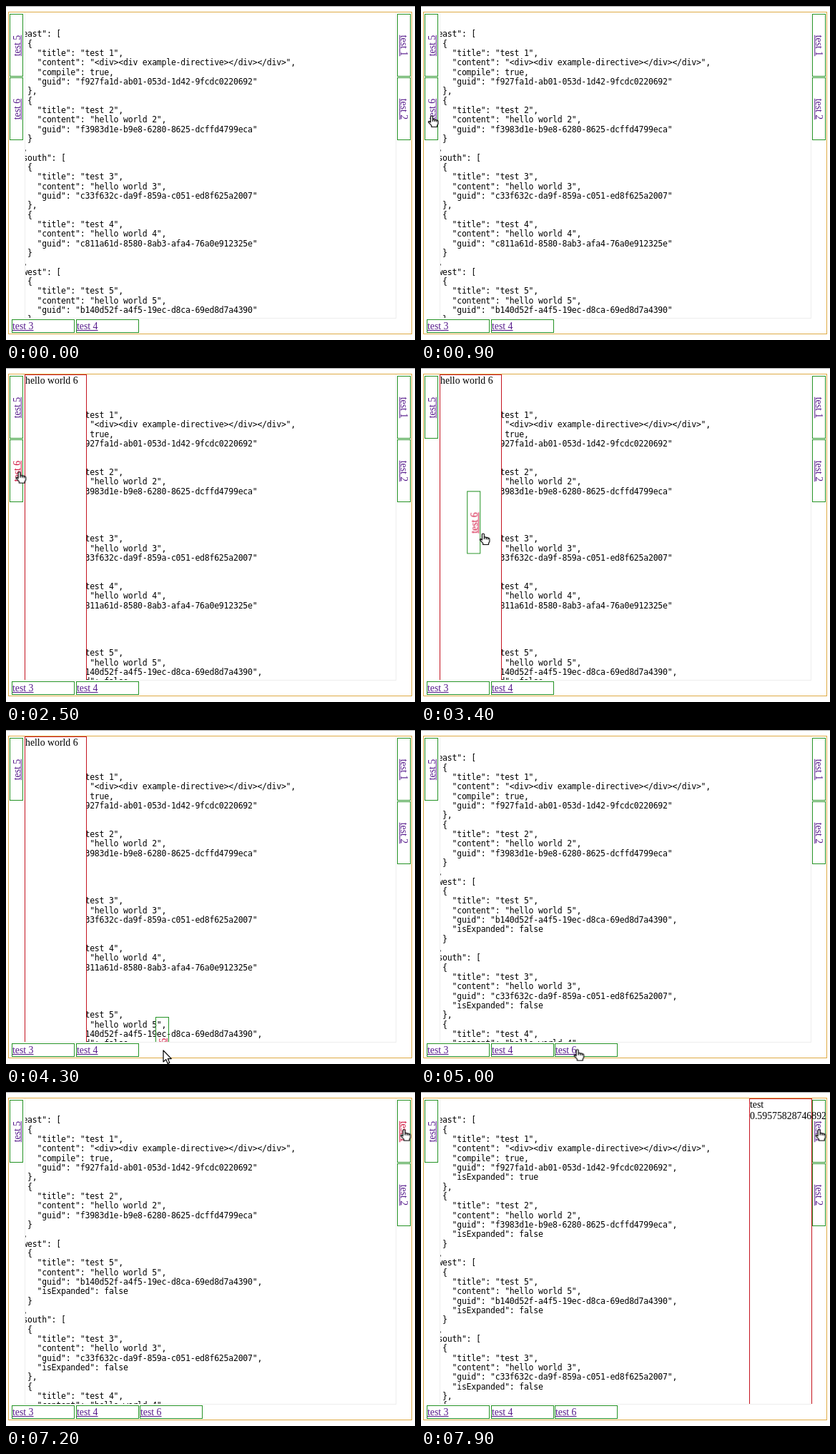
These frames come from a looping animation (572 by 468 pixels, 8000 ms). An HTML page:

```html
<!DOCTYPE html>
<html lang="en">
<head>
<meta charset="utf-8">
<title>Dockable tabs</title>
<style>
html, body { margin: 0; width: 100%; height: 100%; overflow: hidden; background: #fff; }
body { position: relative; font: 13.8px/16px "Liberation Serif", "Times New Roman", serif; color: #000; }
body *, body { box-sizing: border-box; }
div, pre, svg { position: absolute; margin: 0; }

.stage { left: 0; top: 0; width: 572px; height: 468px; overflow: hidden; border-top: 1px solid #a9a9a9; }
.stage > * { margin-top: -1px; }
.frame { left: 3px; top: 8px; width: 565px; height: 452px; border: 1px solid #dfab45; }
.center { left: 26px; top: 9px; width: 520px; height: 429px; overflow: hidden; border: solid #eee; border-width: 0 1px 1px; }
pre { left: -23.67px; top: 11px; font: 11.5px/13.333px "DejaVu Sans Mono", monospace; letter-spacing: -.23px; }

.clip { left: 0; top: 0; width: 567px; height: 437px; overflow: hidden; }
.panel { top: 9px; width: 87px; height: 440px; background: #fff; border: 1px solid #c4141f; }

.tab { width: 88px; height: 19px; border: 1px solid #259325; line-height: 17px; white-space: nowrap; }
.tab span { color: #551a8b; text-decoration: underline; }
.south { top: 439px; }
.west, .east { width: 19px; height: 88px; display: flex; align-items: center; justify-content: center; }
.west { left: 5px; }
.east { left: 547px; }
.west span { transform: rotate(-90deg) translateY(.5px); }
.east span { transform: rotate(90deg); }
.first { top: 11px; }
.second { top: 100px; }

.step { animation: 8s step-end infinite; }
.off { opacity: 0; }
.start { animation-name: start; }
.opened { animation-name: opened; }
.dropped { animation-name: dropped; }
.final { animation-name: final; }
.moved { animation-name: moved; }
@keyframes start { 0% { opacity: 1 } 17.5%, 100% { opacity: 0 } }
@keyframes opened { 0% { opacity: 0 } 17.5% { opacity: 1 } 58.75%, 100% { opacity: 0 } }
@keyframes dropped { 0% { opacity: 0 } 58.75% { opacity: 1 } 91.25%, 100% { opacity: 0 } }
@keyframes final { 0% { opacity: 0 } 91.25%, 100% { opacity: 1 } }
@keyframes moved { 0% { opacity: 0 } 58.75%, 100% { opacity: 1 } }

.drag { animation: drag 8s linear infinite; }
@keyframes drag {
  0%, 31.25% { transform: none; opacity: 1; animation-timing-function: ease-in; }
  42.5% { transform: translate(59px, 72px); animation-timing-function: cubic-bezier(.3, .3, .6, 1); }
  50%, 58.74% { transform: translate(204px, 302px); opacity: 1; }
  58.75%, 100% { transform: translate(204px, 302px); opacity: 0; }
}
.tab .press6 { animation-name: press6; }
.tab .press1 { animation-name: press1; }
@keyframes press6 { 0% { color: #551a8b } 30% { color: #d0103a } 58.75%, 100% { color: #551a8b } }
@keyframes press1 { 0% { color: #551a8b } 88.75% { color: #d0103a } 91.25%, 100% { color: #551a8b } }

.cursor { left: 0; top: 0; overflow: visible; animation: cursor 8s linear infinite; }
.cursor path { fill: #fff; stroke: #000; stroke-width: 1.2; stroke-linejoin: round; }
@keyframes cursor {
  0%, 6.25% { transform: translate(-20px, 230px); animation-timing-function: ease-out; }
  13%, 31.25% { transform: translate(18px, 146px); animation-timing-function: ease-in; }
  42.5% { transform: translate(86px, 232px); animation-timing-function: cubic-bezier(.3, .3, .6, 1); }
  50%, 58.75% { transform: translate(220px, 449px); }
  60%, 75% { transform: translate(218px, 448px); animation-timing-function: ease-in-out; }
  83.5%, 100% { transform: translate(556px, 53px); }
}
.hand { animation-name: hand; }
.arrow { animation-name: arrow; }
@keyframes hand {
  0% { opacity: 0 } 9% { opacity: 1 } 48.5% { opacity: 0 }
  58.75% { opacity: 1 } 76.5% { opacity: 0 } 82%, 100% { opacity: 1 }
}
@keyframes arrow {
  0% { opacity: 1 } 9% { opacity: 0 } 48.5% { opacity: 1 }
  58.75% { opacity: 0 } 76.5% { opacity: 1 } 82%, 100% { opacity: 0 }
}
</style>
</head>
<body>
<div class="stage">
  <div class="center">
    <pre id="start" class="step off start"></pre>
    <pre id="opened" class="step off opened"></pre>
    <pre id="dropped" class="step off dropped"></pre>
    <pre id="final" class="step off final"></pre>
  </div>
  <div class="frame"></div>

  <div class="tab west first"><span>test 5</span></div>
  <div class="tab east first"><span class="step press1">test 1</span></div>
  <div class="tab east second"><span>test 2</span></div>
  <div class="tab south" style="left:8px"><span>test 3</span></div>
  <div class="tab south" style="left:98px"><span>test 4</span></div>
  <div class="tab south step off moved" style="left:187px"><span>test 6</span></div>

  <div class="clip">
    <div class="panel step off opened" style="left:26px">hello world 6</div>
    <div class="panel step off final" style="left:459px; width:88px">test<br>0.59575828746892</div>
    <div class="tab west second drag"><span class="step press6">test 6</span></div>
  </div>

  <svg class="cursor" width="1" height="1">
    <path class="step arrow" d="M0 0V16L3.7 12.6 6.2 18.4 8.8 17.3 6.3 11.6H11.3Z"/>
    <g class="step hand" transform="translate(.6 -.4)">
      <path d="M-1.5 1.2Q-1.5 0 0 0T1.5 1.2V5.3Q3.3 4.2 4.3 5.6 6 4.8 6.8 6.3 9 5.8 9 8V11.3L7.6 13.6V15.5H-.2V13.6L-4.3 9.2Q-5 7.8-3.4 7.6L-1.5 9Z"/>
      <path d="M1.5 5.3V8M4.3 5.8V8.3M6.8 6.5V8.6"/>
    </g>
  </svg>
</div>

<script>
const guids = [
  "f927fa1d-ab01-053d-1d42-9fcdc0220692",
  "f3983d1e-b9e8-6280-8625-dcffd4799eca",
  "c33f632c-da9f-859a-c051-ed8f625a2007",
  "c811a61d-8580-8ab3-afa4-76a0e912325e",
  "b140d52f-a4f5-19ec-d8ca-69ed8d7a4390"
];

function item(n, isExpanded) {
  const first = n === 1;
  return {
    title: "test " + n,
    content: first ? "<div><div example-directive></div></div>" : "hello world " + n,
    compile: first || undefined,
    guid: guids[n - 1],
    isExpanded
  };
}

function show(id, data) {
  document.getElementById(id).textContent = JSON.stringify(data, null, 2);
}

const east = [item(1), item(2)];
const south = [item(3), item(4)];
const west = [item(5, false)];
const southAfter = [3, 4, 6].map(n => item(n, false));

show("start", { east, south, west: [item(5), item(6)] });
show("opened", { east, south, west: [item(5, false), item(6, true)] });
show("dropped", { east, west, south: southAfter });
show("final", { east: [item(1, true), item(2, false)], west, south: southAfter });
</script>
</body>
</html>
```
